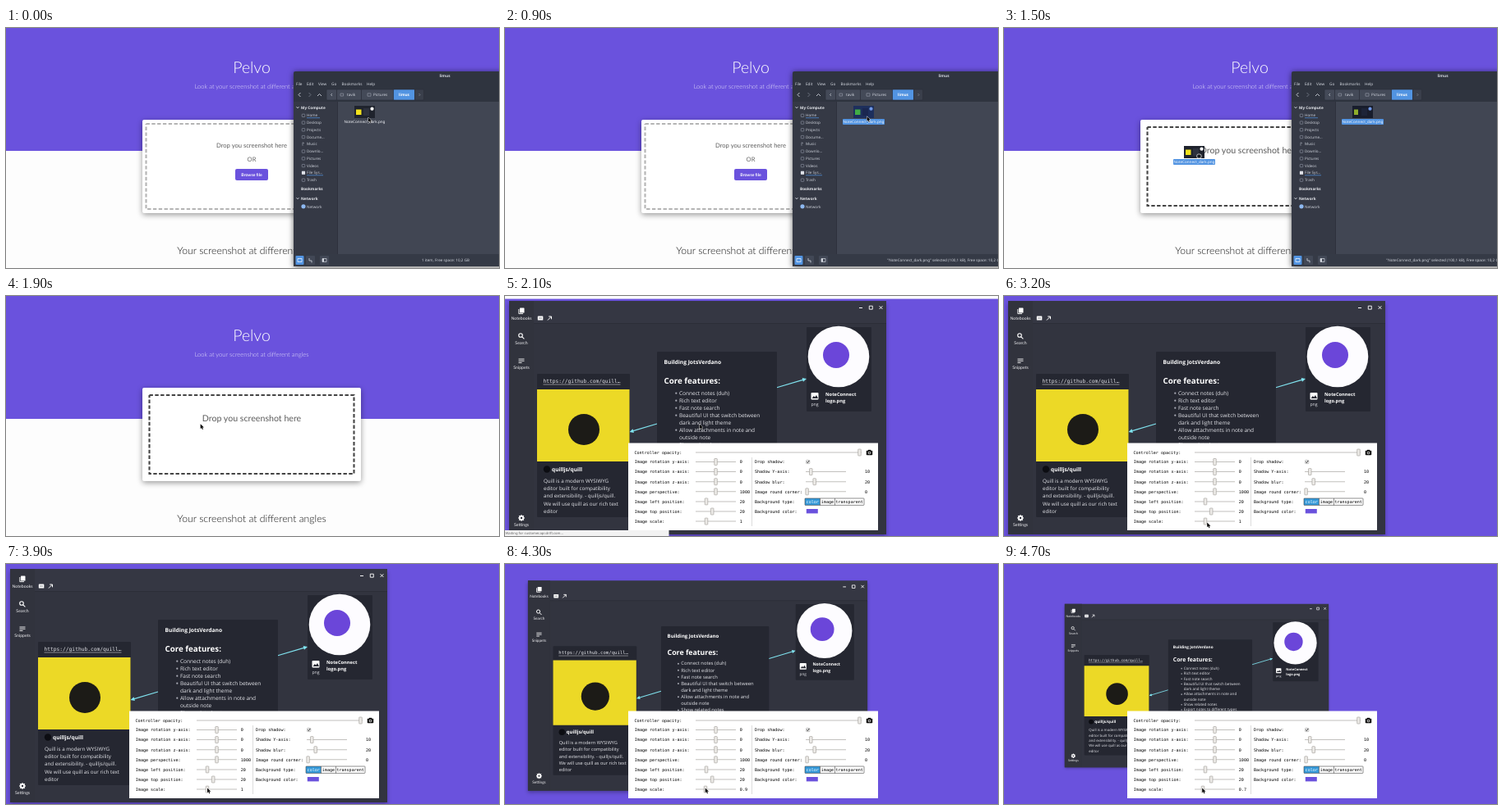
Recreate the animation shown at these times as an HTML page with a canvas. Size 600 px wide and 293 px high, loop 5 s.

```html
<!DOCTYPE html>
<html lang="en">
<head>
<meta charset="utf-8">
<title>Screenshot demo</title>
<style>
html, body { margin: 0; width: 100%; height: 100%; overflow: hidden; background: #fff; }
canvas { display: block; width: 600px; height: 293px; }
</style>
</head>
<body>
<canvas id="stage"></canvas>
<script>
const W = 600, H = 293, LOOP = 5000, STEP = 100;
const PURPLE = '#6a52dd', BLUE = '#5294e2', CYAN = '#80e4f0', CARD = '#252731';
const LATO = 'Lato, sans-serif', NOTO = '"Noto Sans", sans-serif';
const OPEN = '"Open Sans", sans-serif', MONO = '"DejaVu Sans Mono", monospace';

const canvas = document.getElementById('stage');
const c = canvas.getContext('2d');
const ratio = window.devicePixelRatio || 1;
canvas.width = W * ratio;
canvas.height = H * ratio;

const clamp = v => Math.max(0, Math.min(1, v));
const mix = (a, b, k) => a + (b - a) * k;

// y is the middle of the capitals
function text(str, x, y, size, color, family, weight = 400, align = 'left') {
  c.font = `${weight} ${size}px ${family}`;
  c.textAlign = align;
  c.fillStyle = color;
  c.fillText(str, x, y + size * 0.36);
}

function box(x, y, w, h, fill, r = 0) {
  c.fillStyle = fill;
  c.beginPath();
  c.roundRect(x, y, w, h, r);
  c.fill();
}

function frame(x, y, w, h, color, width = 0.6, r = 0) {
  c.strokeStyle = color;
  c.lineWidth = width;
  c.beginPath();
  c.roundRect(x, y, w, h, r);
  c.stroke();
}

function disc(x, y, r, fill) {
  c.fillStyle = fill;
  c.beginPath();
  c.arc(x, y, r, 0, 7);
  c.fill();
}

function line(color, width, ...p) {
  c.strokeStyle = color;
  c.lineWidth = width;
  c.beginPath();
  for (let i = 0; i < p.length; i += 2) c.lineTo(p[i], p[i + 1]);
  c.stroke();
}

function poly(fill, ...p) {
  c.fillStyle = fill;
  c.beginPath();
  for (let i = 0; i < p.length; i += 2) c.lineTo(p[i], p[i + 1]);
  c.fill();
}

function shadowed(color, blur, dy, draw) {
  c.save();
  c.shadowColor = color;
  c.shadowBlur = blur * ratio;
  c.shadowOffsetY = dy * ratio;
  draw();
  c.restore();
}

// ---- landing page ----

function page(hover) {
  box(0, 0, W, H, '#fdfdfd');
  box(0, 0, W, 150, PURPLE);
  text('Pelvo', 299, 47.5, 19.5, '#fff', LATO, 300, 'center');
  text('Look at your screenshot at different angles', 299, 71, 7.6, '#e9e5fb', LATO, 300, 'center');
  shadowed('rgba(0,0,0,.4)', 7, 2, () => box(166, 112, 266, 114, '#fff', 2));

  const inset = 4 * hover, tone = Math.round(mix(180, 68, hover));
  c.setLineDash([4.4, 2.4]);
  frame(170.5 + inset, 117 + inset, 257 - 2 * inset, 104 - 2 * inset, `rgb(${tone},${tone},${tone})`, 2.1);
  c.setLineDash([]);
  text('Drop you screenshot here', 299, mix(143.5, 149.5, hover), mix(7.6, 10.65, hover), '#5c5c5c', LATO, 400, 'center');
  if (!hover) {
    text('OR', 299, 160.5, 7.6, '#666', LATO, 400, 'center');
    box(279, 172, 40, 14, PURPLE, 2);
    text('Browse file', 299, 179, 5.1, '#fff', LATO, 700, 'center');
  }
  text('Your screenshot at different angles', 299, 272, 12.2, '#111', LATO, 300, 'center');
}

// ---- file manager ----

const THUMB = {
  plain: ['#1f232d', '#f2e21d', '#2d313d', '#fff'],
  active: ['#1d2f5c', '#41ad45', '#1a2750', '#6f97e6'],
  dimmed: ['#181d2c', '#8fae2c', '#1d2438', '#6f97e6']
};

function fileIcon(x, y, look, labelled) {
  const [back, mark, card, dot] = THUMB[look];
  box(x + 13, y, 25, 15, back);
  box(x + 24, y + 3, 7, 9, card);
  box(x + 15, y + 4.5, look === 'dimmed' ? 5 : 6.5, 6.5, mark);
  disc(x + 34.5, y + 3.7, 2.1, dot);
  if (labelled) box(x, y + 16, 51, 7, BLUE, 1);
  text('NoteConnect_dark.png', x + 25.5, y + 19.3, 4.6, '#f4f6fa', NOTO, 400, 'center');
}

const PLACES = ['Home', 'Desktop', 'Projects', 'Docume…', 'Music', 'Downlo…', 'Pictures', 'Videos', 'File Sys…', 'Trash'];

function sidebar() {
  const ink = '#c9cdd6';
  c.save();
  c.beginPath();
  c.rect(350, 90, 39, 186);
  c.clip();
  [['My Computer', 97], ['Bookmarks', 196], ['Network', 208]].forEach(([name, y]) => {
    text(name, 359, y, 4.7, '#e6e8ed', NOTO, 700);
    if (y !== 196) line(ink, 0.8, 353.4, y - 1, 355, y + 1, 356.6, y - 1);
  });
  PLACES.forEach((name, i) => {
    const y = 106.7 + i * 8.76;
    text(name, 366, y, 4.6, ink, NOTO);
    if (name === 'Music') line('#a9afbc', 0.6, 361, y + 2, 361, y - 2, 363, y - 1);
    else frame(360.2, y - 1.6, 3.6, 3.4, '#9299a8', 0.6, 0.5);
    if (name === 'File Sys…') box(360, y - 2, 4, 4, '#dfe2e8');
    if (i % 8 === 0) line(BLUE, 0.7, 366, y + 3, i ? 386 : 382, y + 3);
  });
  disc(362, 217.8, 2.6, '#8db8f0');
  text('Network', 366, 218, 4.6, ink, NOTO);
  c.restore();
}

function crumb(x, w, fill) {
  box(x, 75, w, 13, fill, 1);
  frame(x, 75, w, 13, '#2b2e39', 0.6, 1);
}

function fileManager(look, selected) {
  const ink = '#d3d7df';
  shadowed('rgba(0,0,0,.6)', 7, 1, () => box(350, 53, 368, 238, '#2f343f', 2));
  text('limus', 534, 58.7, 4.8, ink, NOTO, 700, 'center');
  [['File', 353], ['Edit', 366], ['View', 380], ['Go', 396], ['Bookmarks', 408.5], ['Help', 439]]
    .forEach(([name, x]) => text(name, x, 68.5, 4.7, ink, NOTO));

  line(ink, 0.9, 358.5, 79, 356, 81.5, 358.5, 84);
  line('#737986', 0.9, 368.5, 79, 371, 81.5, 368.5, 84);
  line(ink, 0.9, 379, 83, 381.5, 80.5, 384, 83);
  crumb(390, 12.5, '#444a58');
  crumb(402.5, 30, '#444a58');
  crumb(432.5, 39, '#444a58');
  crumb(471.5, 26, BLUE);
  crumb(497.5, 11, '#3a3f4b');
  line(ink, 0.7, 397, 80, 395.5, 81.5, 397, 83);
  line('#8b919e', 0.7, 502.5, 80, 504, 81.5, 502.5, 83);
  frame(407, 80, 3.6, 3, '#9aa0ad', 0.6);
  frame(440, 79.8, 4, 3.4, '#9aa0ad', 0.6);
  text('tavik', 415, 81.7, 4.6, ink, NOTO);
  text('Pictures', 447, 81.7, 4.6, ink, NOTO);
  text('limus', 484.5, 81.7, 4.7, '#fff', NOTO, 700, 'center');

  box(350, 90, 54, 186, '#353945');
  box(404, 90, 196, 186, '#414653');
  box(403.4, 90, 0.6, 186, '#2b2e39');
  sidebar();

  box(350, 276, 250, 15, '#353a46');
  box(352.5, 278, 10, 11, BLUE, 1);
  frame(355, 281.5, 5, 4, '#fff', 0.7);
  [365, 382].forEach(x => box(x, 278, 11, 11, '#424856', 1));
  line(ink, 0.8, 369, 281, 369, 284, 372, 284, 372, 286.5);
  frame(385, 281.5, 5, 4, ink, 0.7);
  box(385, 281.5, 2, 4, ink);
  const status = selected
    ? '"NoteConnect_dark.png" selected (100,1 kB), Free space: 10,2 GB'
    : '1 item, Free space: 10,2 GB';
  text(status, 535, 283.3, 4.6, ink, NOTO, 400, 'center');
  fileIcon(411, 95, look, selected);
}

// ---- app screenshot ----

function arrow(x1, y1, x2, y2) {
  const a = Math.atan2(y2 - y1, x2 - x1), s = 5.5;
  const side = d => [x2 - s * Math.cos(a + d), y2 - s * Math.sin(a + d)];
  line(CYAN, 1.2, x1, y1, x2 - 3 * Math.cos(a), y2 - 3 * Math.sin(a));
  poly(CYAN, x2, y2, ...side(0.45), ...side(-0.45));
}

function appSidebar() {
  box(5, 6, 30, 285, '#31333d');
  [['Notebooks', 27], ['Search', 57], ['Snippets', 87.3], ['Settings', 279]]
    .forEach(([name, y]) => text(name, 20, y, 5.2, '#f0f0f3', LATO, 400, 'center'));
  box(18, 14.5, 5.5, 6, '#fff', 0.6);
  line('#fff', 0.9, 16.8, 16, 16.8, 21.6, 22, 21.6);
  c.strokeStyle = '#fff';
  c.lineWidth = 1.1;
  c.beginPath();
  c.arc(19, 48, 2.3, 0, 7);
  c.moveTo(20.8, 49.8);
  c.lineTo(23.4, 52.4);
  c.stroke();
  [[77, 23.5], [79.2, 23.5], [81.4, 20.5]].forEach(([y, x]) => line('#fff', 0.9, 16.5, y, x, y));
  for (let i = 0; i < 4; i++) {
    const a = i * Math.PI / 4, dx = 3.8 * Math.cos(a), dy = 3.8 * Math.sin(a);
    line('#fff', 1.5, 20 - dx, 271 - dy, 20 + dx, 271 + dy);
  }
  disc(20, 271, 2.9, '#fff');
  disc(20, 271, 1.2, '#31333d');
}

const FEATURES = ['Connect notes (duh)', 'Rich text editor', 'Fast note search',
  'Beautiful UI that switch between', '-dark and light theme', 'Allow attachments in note and',
  '-outside note', 'Show related notes', 'Export notes to different types'];
const ABOUT = ['Quill is a modern WYSIWYG', 'editor built for compatibility',
  'and extensibility. - quilljs/quill.', 'We will use quill as our rich text', 'editor'];

function app(scale) {
  const cx = 234.5, cy = 148.5, ink = '#e4e5ea';
  c.save();
  c.translate(cx, cy);
  c.scale(scale, scale);
  c.translate(-cx, -cy);
  shadowed('rgba(0,0,0,.3)', 5 * scale, 2.5 * scale, () => box(5, 6, 459, 285, '#353743'));
  box(35, 33, 429, 258, '#32343f');
  box(35, 33, 429, 0.7, '#2a2c36');
  appSidebar();

  line('#fff', 1, 431, 14.5, 435, 14.5);
  frame(443.3, 12.2, 4, 4, '#fff', 0.9);
  line('#fff', 0.9, 455.6, 12.2, 459.4, 16);
  line('#fff', 0.9, 459.4, 12.2, 455.6, 16);
  box(39.8, 24.5, 6.5, 5, '#fff', 0.6);
  line('#353743', 0.6, 41, 27, 45, 27);
  line('#fff', 1, 52, 29.5, 56.4, 25.1);
  line('#fff', 1, 53.2, 25, 56.5, 25, 56.5, 28.3);

  arrow(185, 156, 151.5, 166);
  arrow(330, 112, 367, 101);

  box(185, 68, 146, 180, CARD, 1);
  text('Building JotsVerdano', 193.5, 81, 6.7, '#fff', OPEN, 700);
  text('Core features:', 193.5, 103, 9.75, '#fff', OPEN, 700);
  FEATURES.forEach((row, i) => {
    const y = 118.3 + i * 9, more = row[0] === '-';
    if (!more) disc(208.3, y + 0.4, 1.1, '#a9abb5');
    text(more ? row.slice(1) : row, 212, y, 6.5, ink, OPEN);
  });

  box(39, 95, 113, 175, CARD, 1);
  text('https://github.com/quill…', 46.5, 104, 6.25, ink, MONO);
  line(ink, 0.5, 46.5, 108, 140.5, 108);
  box(39, 114, 112.5, 88, '#ecd926');
  disc(96, 163, 19, '#1c1b17');
  disc(51, 211.5, 4.2, '#0c0d12');
  text('quilljs/quill', 57, 211.3, 6.6, '#fff', OPEN, 700);
  ABOUT.forEach((row, i) => text(row, 47, 226 + i * 9.1, 6.22, ink, OPEN));

  box(367, 38, 79, 103, CARD, 1);
  disc(406, 74, 37.3, '#fdfcff');
  disc(403, 72, 16, '#6b46d9');
  box(372.5, 118, 9, 8.6, '#fff', 1);
  poly(CARD, 373.6, 125, 375.8, 122, 377.2, 123.6, 379, 121, 381, 125);
  text('png', 377, 132.3, 5.2, ink, OPEN, 400, 'center');
  text('NoteConnect', 390, 119.5, 5.7, '#fff', OPEN, 700);
  text('logo.png', 390, 128.3, 5.7, '#fff', OPEN, 700);
  c.restore();
}

// ---- control panel ----

function slider(x1, x2, y, knob) {
  box(x1, y - 0.5, x2 - x1, 1, '#c2c0bd');
  box(knob - 1.8, y - 4, 3.6, 8, '#eceae7', 0.6);
  frame(knob - 1.8, y - 4, 3.6, 8, '#9c9994', 0.6, 0.6);
}

const label = (str, x, y, color = '#000') => text(str, x, y, 5.05, color, MONO);
const rowY = i => 202.5 + i * 12.1;

function panel(scale) {
  box(150, 179.5, 304, 106.5, '#fff');
  label('Controller opacity:', 157.5, 191);
  slider(232, 434, 191, 431.5);
  box(439.8, 188.8, 7.4, 5.4, '#000', 0.8);
  box(441.8, 187.8, 3.4, 1.6, '#000');
  disc(443.5, 191.5, 1.8, '#fff');
  disc(443.5, 191.5, 1.1, '#000');
  box(300.3, 197, 0.7, 84, '#ccc');

  [['rotation y-axis', 256.5, 0], ['rotation x-axis', 256.5, 0], ['rotation z-axis', 256.5, 0],
    ['perspective', 256.5, 1000], ['left position', 245, 20], ['top position', 252.2, 20],
    ['scale', 245 - (1 - scale) * 10, +scale.toFixed(2)]
  ].forEach(([name, knob, value], i) => {
    label(`Image ${name}:`, 157.8, rowY(i));
    slider(232, 281, rowY(i), knob);
    label(String(value), 285.8, rowY(i));
  });

  ['Drop shadow:', 'Shadow Y-axis:', 'Shadow blur:', 'Image round corner:', 'Background type:', 'Background color:']
    .forEach((name, i) => label(name, 304, rowY(i)));
  frame(366.6, 200.4, 4.2, 4.2, '#999', 0.6, 0.5);
  line('#111', 0.9, 367.4, 202.4, 368.4, 203.6, 370.2, 201);
  [[372.3, 10], [376.7, 20], [367.6, 0]].forEach(([knob, value], i) => {
    slider(366, 415, rowY(i + 1), knob);
    label(String(value), 438, rowY(i + 1));
  });

  box(365, 247, 18.3, 8.4, '#3498d8');
  frame(365, 247, 72, 8.4, '#444', 0.6, 0.6);
  [383.3, 401.2].forEach(x => box(x, 247, 0.6, 8.4, '#444'));
  label('color', 366.6, 251, '#fff');
  label('image', 384.8, 251);
  label('transparent', 402.4, 251);
  box(366.8, 260, 14, 5.4, PURPLE);
}

// ---- pointer ----

const PATH = [[0, 441, 109], [100, 441, 109], [350, 381, 122], [600, 441, 108.5], [700, 440.5, 108],
  [900, 440.5, 108], [1400, 236.5, 156], [2800, 237, 157], [3200, 247.2, 276.5], [3300, 247.2, 276.5],
  [3900, 245, 273.5], [4200, 244.6, 273.5], [4300, 243.7, 273.5], [4700, 241.2, 273.5]];

function pointerAt(t) {
  const i = PATH.findIndex(p => p[0] > t);
  if (i < 0) return PATH[PATH.length - 1].slice(1);
  const [t0, x0, y0] = PATH[i - 1], [t1, x1, y1] = PATH[i];
  const k = (t - t0) / (t1 - t0), e = k * k * (3 - 2 * k);
  return [mix(x0, x1, e), mix(y0, y1, e)];
}

function pointer(x, y) {
  c.save();
  c.translate(x, y);
  c.scale(0.85, 0.85);
  c.beginPath();
  [0, 0, 0, 6.8, 1.6, 5.4, 2.7, 8, 3.9, 7.5, 2.8, 5, 5, 4.9].forEach((v, i, p) => i % 2 || c.lineTo(v, p[i + 1]));
  c.closePath();
  c.lineJoin = 'round';
  c.strokeStyle = '#fff';
  c.lineWidth = 1;
  c.stroke();
  c.fillStyle = '#000';
  c.fill();
  c.restore();
}

function grabHand(x, y) {
  box(x - 1.8, y - 2, 5.4, 5, '#15171c', 2);
  frame(x - 1.8, y - 2, 5.4, 5, '#fff', 0.7, 2);
}

// ---- timeline ----

function draw(t) {
  c.setTransform(ratio, 0, 0, ratio, 0, 0);
  c.textRendering = 'geometricPrecision';
  const [x, y] = pointerAt(t);

  if (t < 2100) {
    const dragging = t >= 1000 && t < 1900;
    page(clamp((t - 1200) / 300));
    if (t < 1900) fileManager(t < 600 ? 'plain' : dragging ? 'dimmed' : 'active', t >= 600);
    if (dragging) {
      fileIcon(x - 30.5, y - 12, 'plain', true);
      grabHand(x, y);
    } else pointer(x, y);
    return;
  }

  const scale = t < 4300 ? 1 : mix(0.9, 0.7, clamp((t - 4300) / 400));
  box(0, 0, W, H, PURPLE);
  if (t < 2200) box(0, 0, W, 3.6, '#fdfdfd');
  app(scale);
  panel(scale);
  if (t < 2500) {
    box(0, 286, 199.5, 7, '#f2f2f2');
    text('Waiting for customer.api.drift.com...', 0.5, 289.3, 4.2, '#666', NOTO);
  }
  pointer(x, y);
}

function tick() {
  const t = performance.now() % LOOP;
  draw(Math.floor(t / STEP) * STEP);
  requestAnimationFrame(tick);
}
tick();
</script>
</body>
</html>
```
